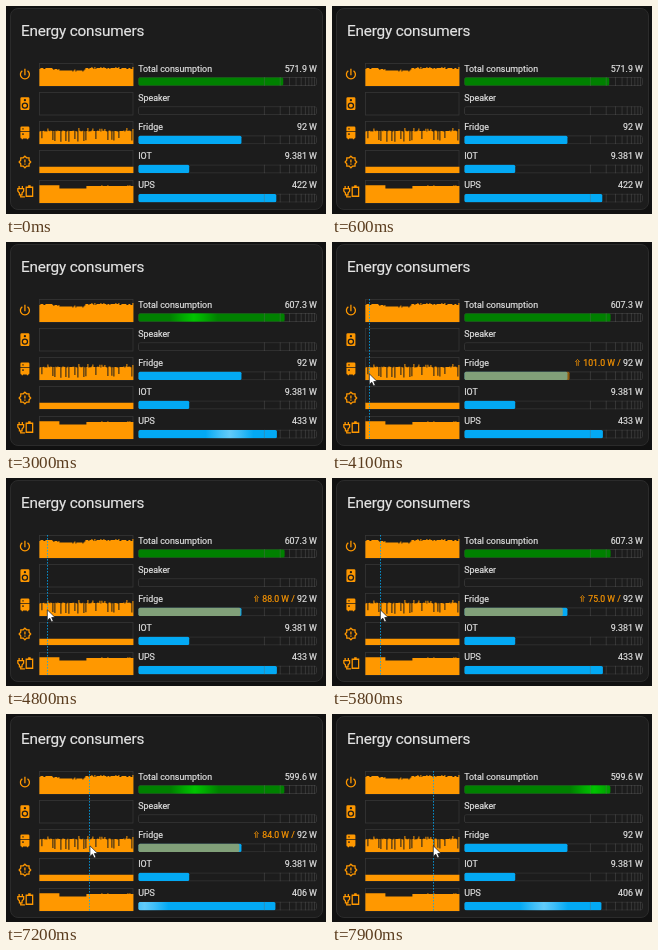
Animation, 320 px wide and 208 px high, one loop 8000 ms. Source, as an HTML page:

```html
<!DOCTYPE html>
<html lang="en">
<head>
<meta charset="utf-8">
<title>Energy consumers</title>
<style>
html, body { margin: 0; width: 100%; height: 100%; overflow: hidden; background: #111; }
svg { display: block; width: 100vw; height: 100vh; }
text { font: 8.9px Roboto, "Noto Sans", sans-serif; fill: #e4e4e4; stroke: #e4e4e4; stroke-width: .18px; }
.title { font-size: 15.3px; letter-spacing: -.012em; }
.end { text-anchor: end; }
.past { font-size: 8.7px; fill: #ff9800; stroke: #ff9800; }
</style>
</head>
<body>
<svg id="stage" viewBox="0 0 320 208">
  <defs id="defs"></defs>
  <rect x="4.5" y="2.5" width="312" height="201" rx="7.5" fill="#1c1c1c" stroke="#2b2b2b"/>
  <text class="title" x="15" y="30.4">Energy consumers</text>
</svg>
<script>
const LOOP = 8000, ROW = 29.15, BAR_X = 132, BAR_W = 179, BAR_H = 9, MAX = 2500;
const ORANGE = '#ff9800', BLUE = '#03a9f4', CARD = '#1c1c1c';
const SWEEP_SPEED = 0.105, SWEEP_HALF = 24;
const stage = document.getElementById('stage');
const defs = document.getElementById('defs');

function add(parent, tag, attrs = {}, text) {
  const el = document.createElementNS('http://www.w3.org/2000/svg', tag);
  set(el, attrs);
  if (text) el.textContent = text;
  parent.append(el);
  return el;
}
function set(el, attrs) {
  for (const key in attrs) el.setAttribute(key, attrs[key]);
}

// Bars use a logarithmic scale from 1 W to MAX.
const barLength = watts => BAR_W * Math.log10(watts) / Math.log10(MAX);

// Latest entry [time, value, ...] that has started.
const current = (steps, t) => steps.filter(s => s[0] <= t).pop();

function interpolate(keys, t) {
  const i = keys.findIndex(k => k[0] > t);
  if (i < 0) return keys[keys.length - 1][1];
  if (i === 0) return keys[0][1];
  const [t0, a] = keys[i - 1], [t1, b] = keys[i];
  return a + (b - a) * (t - t0) / (t1 - t0);
}

function random(seed) {
  return () => (seed = (seed * 16807) % 2147483647) / 2147483647;
}
const noise = random(71);

// Height of each one-pixel history column.
const history = {
  total: x => (x < 14 ? 18 : x < 20 ? 17 : x < 46 ? 15.5 : 18)
    + (noise() < .25 ? -1 : noise() < .15 ? 1 : 0),
  none: () => 0,
  fridge: () => noise() < .24 ? 2 + noise() * 4 : 12.5 + noise() + (noise() < .08 ? 2.5 : 0),
  iot: () => 6.3,
  ups: x => (x < 20 ? 17.8 : x < 47 ? 14.5 : 17) + (x > 58 && noise() < .1 ? .8 : 0)
};

const icons = {
  total: g => add(g, 'path', { d: 'M12 3V13M8 6A7 7 0 1 0 16 6' }),
  none: g => {
    add(g, 'rect', { x: 6, y: 3, width: 12, height: 18, rx: 1, fill: ORANGE });
    add(g, 'circle', { cx: 12, cy: 15, r: 4, stroke: CARD });
    add(g, 'circle', { cx: 12, cy: 6.5, r: 1.8, fill: CARD, stroke: 'none' });
  },
  fridge: g => {
    add(g, 'path', { d: 'M7 2H17Q19 2 19 4V9H5V4Q5 2 7 2M5 10.5H19V19Q19 21 17 21V22H15V21H9V22H7V21Q5 21 5 19Z', fill: ORANGE, stroke: 'none' });
    add(g, 'path', { d: 'M9 5V7M9 12.5V15.5', stroke: CARD });
  },
  iot: g => {
    const points = Array.from({ length: 16 }, (_, i) => {
      const r = i % 2 ? 7 : 9, a = i * Math.PI / 8;
      return [12 + r * Math.sin(a), 12 - r * Math.cos(a)].map(v => v.toFixed(1));
    });
    add(g, 'polygon', { points: points.join(' ') });
    add(g, 'path', { d: 'M12 8V13M12 14.5V16.5' });
  },
  ups: g => add(g, 'path', { d: 'M1 8H10V12L7.5 15V18H3.5V15L1 12ZM3 4V8M8 4V8M5.5 18V21H12M14 16V6H24V20H14ZM17 4H21' })
};

// values: [time, watts, label]; sweeps: start times of the highlight.
const rows = [
  { kind: 'total', name: 'Total consumption', color: '#008000', glow: '#00c400',
    values: [[0, 571.9, '571.9 W'], [2500, 607.3, '607.3 W'], [6650, 599.6, '599.6 W']],
    sweeps: [2470, 6660] },
  { kind: 'none', name: 'Speaker', color: BLUE, values: [[0, 1, '']], sweeps: [] },
  { kind: 'fridge', name: 'Fridge', color: BLUE, values: [[0, 92, '92 W']], sweeps: [] },
  { kind: 'iot', name: 'IOT', color: BLUE, values: [[0, 9.381, '9.381 W']], sweeps: [] },
  { kind: 'ups', name: 'UPS', color: BLUE, glow: '#62cbfa',
    values: [[0, 422, '422 W'], [2180, 433, '433 W'], [7140, 406, '406 W']],
    sweeps: [2130, 7140] }
];

function buildGraph(kind, y) {
  const bottom = y + 23;
  let d = '';
  for (let x = 0; x < 94; x++) {
    const h = history[kind](x).toFixed(1);
    if (h > 0) d += `M${33.4 + x} ${bottom}v${-h}h1v${h}z`;
  }
  add(stage, 'rect', { x: 33.5, y: y + .5, width: 93.5, height: 22.5, fill: 'none', stroke: '#363636', 'stroke-width': .8 });
  add(stage, 'path', { d, fill: ORANGE });
}

function buildGlow(row) {
  row.gradient = add(defs, 'linearGradient', { id: 'glow-' + row.kind, gradientUnits: 'userSpaceOnUse' });
  [[0, 0], [.3, .65], [.5, 1], [.7, .65], [1, 0]].forEach(([offset, opacity]) =>
    add(row.gradient, 'stop', { offset, 'stop-color': row.glow, 'stop-opacity': opacity }));
}

rows.forEach((row, i) => {
  const y = 57 + i * ROW, barY = y + 14;
  const icon = add(stage, 'g', {
    transform: `translate(11.2 ${y + 3.8}) scale(.643)`,
    fill: 'none', stroke: ORANGE, 'stroke-width': 2
  });
  icons[row.kind](icon);
  buildGraph(row.kind, Math.round(y));
  add(stage, 'text', { x: 132.2, y: y + 8.6 }, row.name);
  row.label = add(stage, 'text', { x: 311, y: y + 8.6, class: 'end' });

  const clip = add(defs, 'clipPath', { id: 'bar-' + row.kind });
  add(clip, 'rect', { x: BAR_X, y: barY, width: BAR_W, height: BAR_H, rx: 2 });
  const bar = add(stage, 'g', { 'clip-path': `url(#bar-${row.kind})` });
  const strip = { x: BAR_X + .5, y: barY + .4, width: 0, height: BAR_H - .8 };
  add(bar, 'rect', { x: BAR_X + .5, y: barY + .5, width: BAR_W - 1, height: BAR_H - 1, rx: 1.6, fill: CARD, stroke: '#333' });
  row.fill = add(bar, 'rect', { ...strip, fill: row.color, rx: 1.5 });
  if (row.glow) {
    buildGlow(row);
    row.shine = add(bar, 'rect', { ...strip, fill: `url(#glow-${row.kind})`, rx: 1.5 });
  }
  if (row.kind === 'fridge') row.past = add(bar, 'rect', { ...strip, fill: ORANGE, opacity: .5, rx: 1.5 });
  for (let watts = 250; watts < MAX; watts += 250) {
    add(bar, 'rect', { x: BAR_X + barLength(watts) - .4, y: barY, width: .8, height: BAR_H, fill: '#666', opacity: .45 });
  }
});

const fridge = rows[2], fridgeY = 57 + 2 * ROW + 8.6;
const hover = add(stage, 'g');
const hoverText = add(hover, 'text', { x: 288.8, y: fridgeY, class: 'end past' });
const hoverArrow = add(hover, 'path', { d: 'M0 -4L2.3 -6.5L4.6 -4M1.5 -4.8V0M3.1 -4.8V0', fill: 'none', stroke: ORANGE, 'stroke-width': .7 });
const hoverLine = add(stage, 'path', { d: 'M0 57V197', stroke: BLUE, 'stroke-width': .8, 'stroke-dasharray': '1.6 1.4' });
const cursor = add(stage, 'path', { d: 'M0 0V10.6L2.5 8.4L4.2 12.2L6 11.4L4.4 7.7H7.8Z', fill: '#fff', stroke: '#111', 'stroke-width': .7 });

const cursorPath = [[3600, -10], [3900, 27], [4000, 34], [4100, 37], [4800, 41], [5000, 42.5],
  [5200, 42.5], [5500, 48], [5800, 48], [6500, 71], [6700, 73], [7500, 90], [7900, 101]];
const pastValues = [[0, 0], [4000, 101], [4700, 88], [5300, 75], [6200, 172], [6900, 84], [7650, 0]];

function render(t) {
  for (const row of rows) {
    const [, watts, label] = current(row.values, t);
    const width = Math.max(0, barLength(watts) - .5);
    row.label.textContent = label;
    set(row.fill, { width });
    if (!row.shine) continue;
    const start = row.sweeps.filter(s => s <= t).pop();
    const center = start === undefined ? -100 : BAR_X + (t - start) * SWEEP_SPEED;
    set(row.shine, { width });
    set(row.gradient, { x1: center - SWEEP_HALF, x2: center + SWEEP_HALF });
  }

  const past = current(pastValues, t)[1];
  hover.style.display = past ? '' : 'none';
  set(fridge.past, { width: past ? barLength(past) - .5 : 0 });
  if (past) {
    const digits = past.toFixed(1);
    hoverText.textContent = `${digits} W /`;
    set(hoverArrow, { transform: `translate(${243.2 + (5 - digits.length) * 4.9} ${fridgeY})` });
  }

  const x = interpolate(cursorPath, t);
  hoverLine.style.display = t >= 4000 ? '' : 'none';
  cursor.style.display = t >= 3600 ? '' : 'none';
  set(hoverLine, { transform: `translate(${Math.floor(x) + .5} 0)` });
  set(cursor, { transform: `translate(${x + .3} 131.8)` });
}

const began = performance.now();
function tick() {
  render((performance.now() - began) % LOOP);
  requestAnimationFrame(tick);
}
tick();
</script>
</body>
</html>
```
